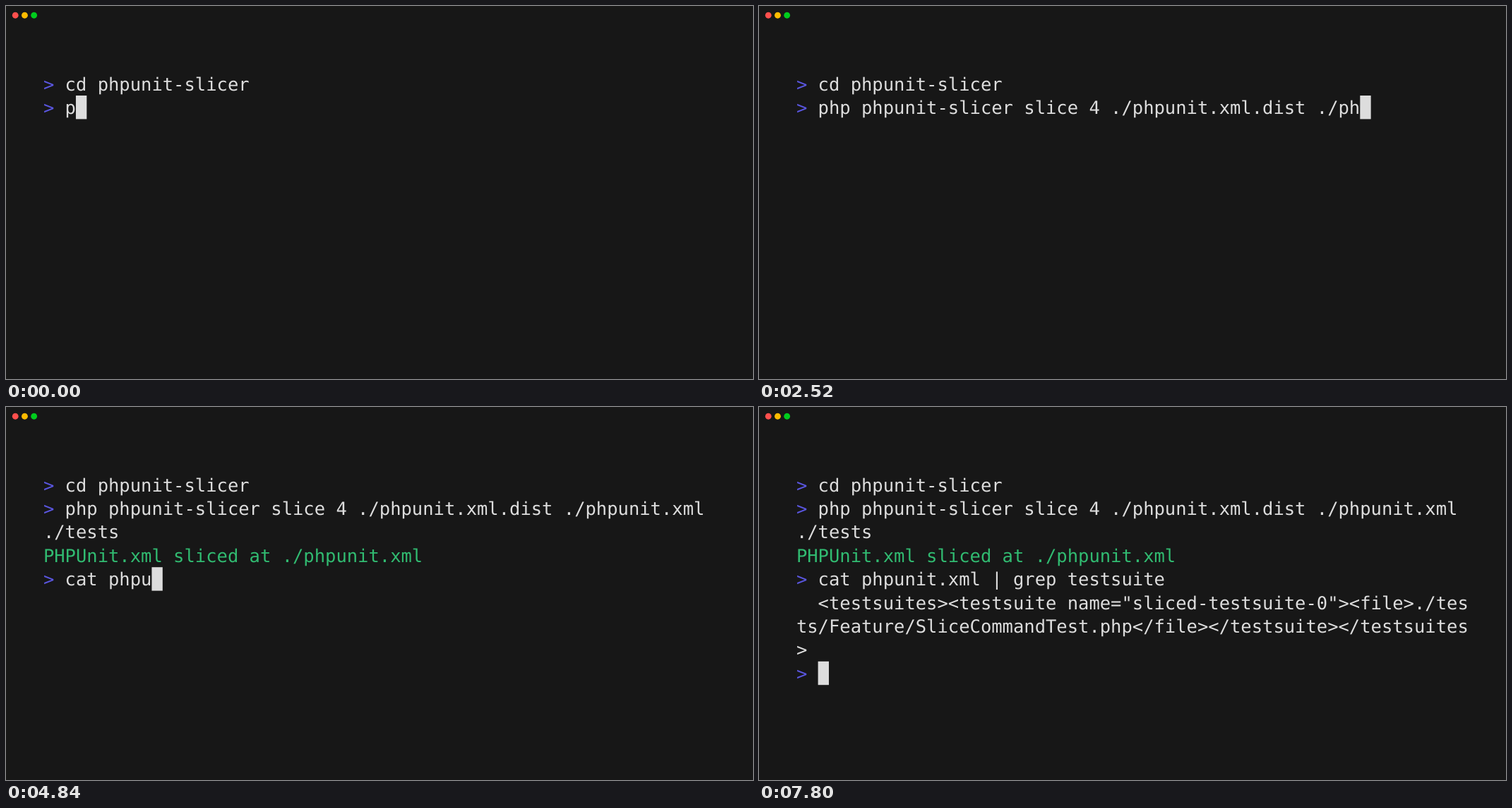
An HTML page for the animation above (8000 ms loop, 1058 by 529 pixels).

```html
<!DOCTYPE html>
<html lang="en">
<head>
<meta charset="utf-8">
<title>Terminal</title>
<style>
  html, body { margin: 0; width: 100%; height: 100%; overflow: hidden; background: #171717; }
  svg { display: block; width: 1058px; height: 529px; }
  text {
    font: 25.5px "DejaVu Sans Mono", "Noto Sans Mono", monospace;
    font-variant-ligatures: none;
    text-rendering: geometricPrecision;
    white-space: pre;
    fill: #ddd;
  }
  .prompt { fill: #5a56e0; }
  .ok { fill: #31bb71; }
</style>
</head>
<body>
<svg id="stage" viewBox="0 0 1058 529">
  <circle cx="13.22" cy="13.22" r="4.41" fill="#ff4f4d"/>
  <circle cx="26.45" cy="13.22" r="4.41" fill="#febb00"/>
  <circle cx="39.67" cy="13.22" r="4.41" fill="#00cc1d"/>
</svg>
<script>
const LOOP = 8000, TICK = 40;
const LEFT = 52.9, TOP = 93.6, CELL = 15.354, LINE = 33.4, BASE = 26, COLS = 62;

const SLICE = "php phpunit-slicer slice 4 ./phpunit.xml.dist ./phpunit.xml ./tests";
const GREP = "cat phpunit.xml | grep testsuite";
const RESULT = '  <testsuites><testsuite name="sliced-testsuite-0"><file>./tes' +
  "ts/Feature/SliceCommandTest.php</file></testsuite></testsuites>";

// Typing rhythm as [time, characters typed]
const SLICE_KEYS = [[0, 1], [80, 2], [720, 15], [800, 16], [840, 17], [920, 18], [1560, 31],
  [1600, 32], [1720, 34], [1760, 35], [2520, 50], [2600, 52], [3400, 67]];
const GREP_KEYS = [[4400, 0], [4440, 1], [5240, 16], [5280, 17], [5560, 22], [5600, 23], [6080, 32]];
const ENTER = 3920, SLICED = 4040, LISTED = 6600, BLINK = 600;

const stage = document.getElementById("stage");

function add(tag, attrs) {
  const el = document.createElementNS("http://www.w3.org/2000/svg", tag);
  for (const name in attrs) el.setAttribute(name, attrs[name]);
  return stage.appendChild(el);
}

const addText = (row, col, kind) =>
  add("text", { x: LEFT + col * CELL, y: TOP + row * LINE + BASE, class: kind });

const prompts = [0, 1, 4, 8].map(row => addText(row, 0, "prompt"));
const lines = Array.from({ length: 8 }, (_, row) =>
  addText(row, [0, 1, 4].includes(row) ? 2 : 0, row === 3 ? "ok" : "out"));
const cursor = add("rect", { width: CELL, height: LINE, fill: "#ddd" });

function setText(el, value) {
  if (el.textContent !== value) el.textContent = value;
}

function typed(keys, t) {
  if (t <= keys[0][0]) return keys[0][1];
  for (let i = 1; i < keys.length; i++) {
    const [t0, n0] = keys[i - 1], [t1, n1] = keys[i];
    if (t < t1) return Math.floor(n0 + (n1 - n0) * (t - t0) / (t1 - t0) + 1e-6);
  }
  return keys[keys.length - 1][1];
}

function cursorCell(t, sliceCount, grepCount) {
  if (t >= LISTED) return [8, 2];
  if (t >= SLICED) return [4, 2 + grepCount];
  if (t >= ENTER) return [3, 0];
  const pos = 2 + sliceCount;
  return [1 + Math.floor(pos / COLS), pos % COLS];
}

function render(time) {
  const t = Math.floor(time / TICK) * TICK;
  const sliceCount = typed(SLICE_KEYS, t);
  const grepCount = typed(GREP_KEYS, t);
  const sliced = t >= SLICED, listed = t >= LISTED;
  const slice = SLICE.slice(0, sliceCount);

  const rows = [
    "cd phpunit-slicer",
    slice.slice(0, COLS - 2),
    slice.slice(COLS - 2),
    sliced ? "PHPUnit.xml sliced at ./phpunit.xml" : "",
    GREP.slice(0, grepCount),
    ...[0, 1, 2].map(i => listed ? RESULT.slice(i * COLS, (i + 1) * COLS) : "")
  ];
  rows.forEach((value, i) => setText(lines[i], value));
  [true, true, sliced, listed].forEach((on, i) => setText(prompts[i], on ? ">" : ""));

  const [row, col] = cursorCell(t, sliceCount, grepCount);
  const lit = !listed || Math.floor((t - LISTED) / BLINK) % 2 === 0;
  cursor.setAttribute("x", LEFT + col * CELL);
  cursor.setAttribute("y", TOP + row * LINE);
  cursor.setAttribute("visibility", lit ? "visible" : "hidden");
}

const start = performance.now();
function loop() {
  render((performance.now() - start) % LOOP);
  requestAnimationFrame(loop);
}
loop();
</script>
</body>
</html>
```
